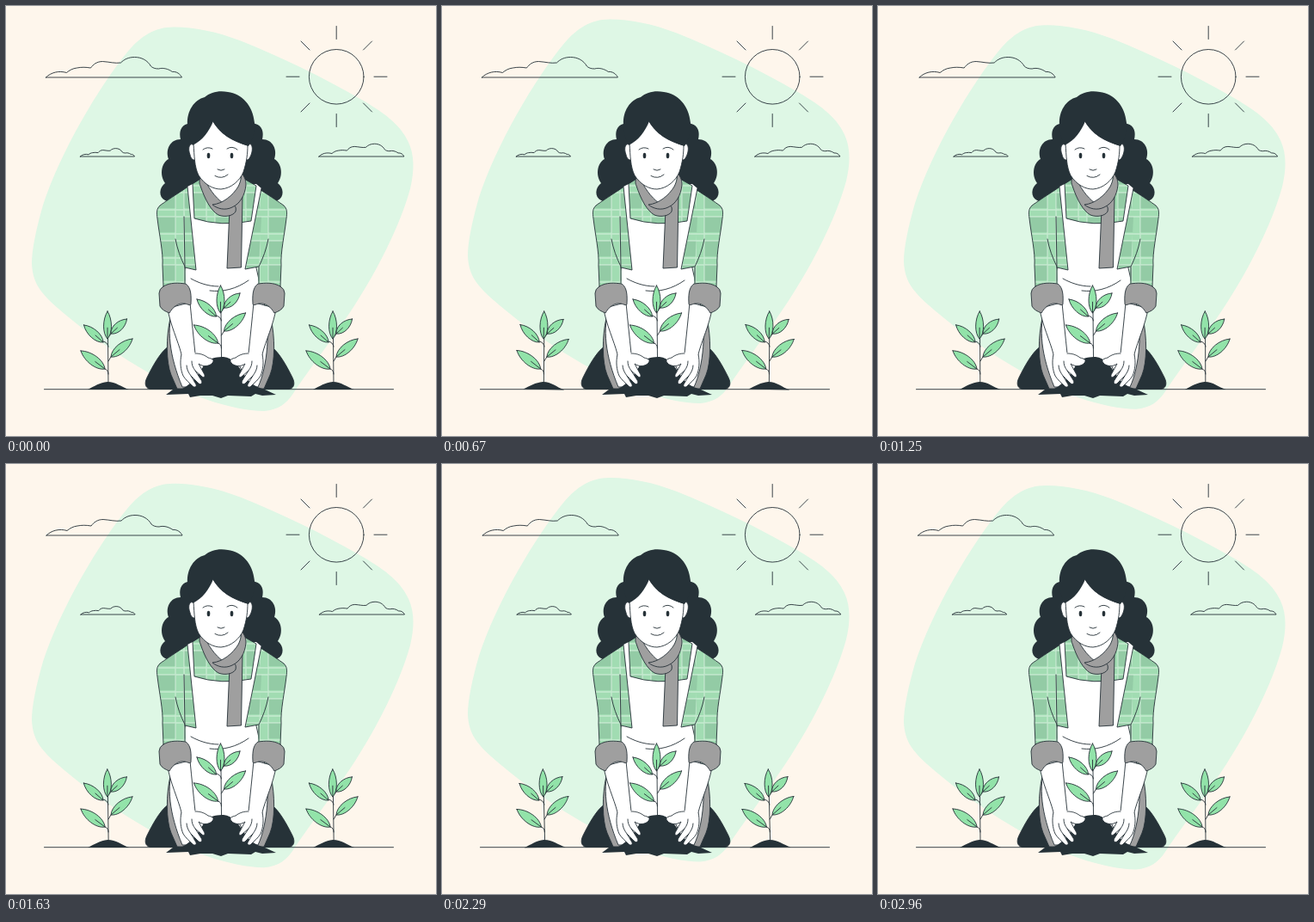
Recreate the animation shown at these times as an HTML page. Size 500 by 500 pixels, loop 3 s.

```html
<!DOCTYPE html>
<html lang="en">
<head>
<meta charset="utf-8">
<title>Planting</title>
<style>
  html, body { margin: 0; width: 100%; height: 100%; overflow: hidden; background: #fef6ec; }
  svg { display: block; width: 100%; height: 100%; }
  .line { fill: none; }
  .dark { fill: #263238; }
  .white { fill: #fff; }
  .grey { fill: #9f9f9f; }
  .leaf { fill: #92e3a9; }
  .plaid { fill: url(#plaid); }
  .bare { stroke: none; }
</style>
</head>
<body>
<svg viewBox="0 0 500 500" stroke="#263238" stroke-width=".9" stroke-linecap="round" stroke-linejoin="round">
  <defs>
    <pattern id="plaid" x="193" y="232" width="36" height="28" patternUnits="userSpaceOnUse">
      <path class="bare" fill="#93cba5" d="M0 0H36V28H0Z"/>
      <g class="line" stroke-linecap="butt">
        <path stroke="#b0edc0" stroke-width="10" stroke-opacity=".5" d="M9 0V28M0 8H36"/>
        <path stroke="#fff" stroke-width="1.3" stroke-opacity=".4" d="M4 0V28M14 0V28M0 5H36M0 13H36"/>
      </g>
    </pattern>
    <path id="cloud" class="line" vector-effect="non-scaling-stroke" d="M0 0H158C156-4 152-7 147-6.500C142-10 136-11.500 131-10C127-10 124-11 122-13C118-20 111-23.500 103-23.500C96-23.500 91-21 87-17C80-16 74-18 66-18.500C59-18.500 55-15 52-11C46-12 41-12 36-11C31-10.500 27-8 24-5.500C15-8 6-6 0 0Z"/>
    <g id="plant"></g>
    <path id="mound" class="dark bare" d="M95 446C103 442 109 438 118 437C128 437 134 443 143 446Z"/>
    <path id="curls" class="dark bare" d="M251 125L211 137C203 139 201 147 203 155C191 155 185 167 189 178C181 182 178 196 185 206C178 211 177 222 185 226C193 230 207 226 220 215L251 215Z"/>
    <path id="knee" class="dark" d="M189 396C179 402 169 422 164 432C160 440 163 445 168 445.500H201Z"/>
    <path id="side" class="grey" d="M191 363C186 385 186 414 192 429L199 445H214L211 400Z"/>
    <g id="sleeve">
      <path class="plaid bare" d="M218 206C206 214 190 224 179 232C175 236 175 240 176 247C178 265 183 287 182 302L183 326L209 325L207 246L212 212Z"/>
      <path class="line" d="M218 206C206 214 190 224 179 232C175 236 175 240 176 247C178 265 183 287 182 302L183 326M208 304V322M197 271C199 282 203 293 208 303"/>
    </g>
    <g id="arm">
      <path class="white" d="M188 352C191 371 200 389 204 405L210 432H224L232 415L220 404C218 385 216 366 214 345Z"/>
      <path class="grey" d="M183 326C191 321 201 322 209 323C213 326 216 331 215 346C215 349 212 347 208 346C200 345 194 350 190 357C185 355 181 353 179 349L178 334Q178 329 183 326Z"/>
    </g>
    <g id="hand">
      <path class="white bare" d="M204 404C202 414 203 423 206 430C209 435 213 438 217 442C219 444 222 443 221 440L215 430L224 439C227 441 229 438 227 435L220 424L228 431C231 433 232 430 230 427L224 416C229 420 237 419 240 415C243 411 239 410 235 409C230 405 225 404 220 403Z"/>
      <path class="line" d="M204 405C202 414 203 423 206 430C209 435 213 438 217 442C219 444 222 443 221 440L215 430L224 439C227 441 229 438 227 435L220 424L228 431C231 433 232 430 230 427L224 416C229 420 237 419 240 415C243 411 239 410 235 409C230 405 225 404 220 404M215 430C212 426 210 422 210 418M220 424C217 420 216 417 216 413"/>
    </g>
  </defs>

  <path id="blob" class="bare" fill="#def7e5" d="M197 25C175 24 157 35 142 53C108 94 63 171 43 232C35 260 30 284 30 300C31 323 41 334 57 349C109 394 171 436 233 458C259 467 281 471 300 471.500C317 470 326 463 334 451C362 409 399 364 430 307C449 272 463 239 470 213C475 192 475 174 468 159C458 137 437 123 411 108C368 83 320 60 273 41C244 30 218 25 197 25Z"/>
  <g id="sky">
    <use href="#cloud" transform="translate(46.600 83)"/>
    <use href="#cloud" transform="translate(86.500 175) scale(.4)"/>
    <use href="#cloud" transform="translate(364 175) scale(.627)"/>
  </g>
  <g class="line">
    <circle cx="384.200" cy="82.300" r="31.800"/>
    <path d="M384.200 23.500V38.500M384.200 125.500V140.500M326 82.200H341M428 82.200H443M343 41L353 51M425.500 41L415.500 51M343 123L353 113M425.500 123L415.500 113"/>
    <path d="M44.500 445.700H450.500"/>
  </g>

  <g class="sprout"><use href="#plant"/><use href="#mound"/></g>
  <g class="sprout"><use href="#plant" x="262"/><use href="#mound" x="262"/></g>

  <use href="#curls"/><use href="#curls" transform="matrix(-1 0 0 1 501 0)"/>
  <use href="#knee"/><use href="#knee" transform="matrix(-1 0 0 1 497 0)"/>
  <use href="#side"/><use href="#side" transform="matrix(-1 0 0 1 499 0)"/>
  <path class="white" d="M210 300L195 348C186 375 190 407 205 443H293C304 420 308 375 300 345L290 300Z"/>

  <use href="#sleeve"/><use href="#sleeve" transform="matrix(-1 0 0 1 502 0)"/>
  <path class="plaid bare" d="M211 210L207 246L208 304L221 307L278 306L294 303L297 246L292 210Z"/>
  <path class="white bare" d="M211 210L221 307L216 318H283L278 306L297 212L291 207H217Z"/>
  <path class="line" d="M211 210L221 307L208 304M207 245L208 304M297 212L278 306L294 303"/>
  <path class="plaid" d="M217 207L219 247Q250 257 285 250L291 209L275 200H228Z"/>
  <path class="line" d="M215 317C224 322 235 326 247 326M237 331C252 333 268 329 282 319"/>
  <use href="#arm"/><use href="#arm" transform="matrix(-1 0 0 1 502 0)"/>

  <path class="grey" d="M260 236L257 305L273.500 304L275 222Z"/>
  <path class="white bare" d="M228 194L232 212L250 231L270 215L274 194Z"/>
  <path class="grey" d="M228 195C225 199 224 205 226 209C231 224 238 238 247 243C255 246 264 244 267 239C269 230 262 230 252 229C243 222 235 212 228 195Z"/>
  <path class="grey" d="M273 194C277 197 279 202 279 208C278 220 272 230 263 234C255 238 246 236 240 231C252 230 264 220 270 210C273 204 274 199 273 194Z"/>
  <path class="white" d="M220 161C213 158 211 165 214 173C215 178 218 180 221 179M279 161C286 157 288 165 285 173C283 178 281 180 278 179"/>
  <path class="white" d="M240 133C234 145 226 154 218 160C219 174 219 187 224 197C231 208 241 213 250 213C262 212 272 203 276 193C280 181 281 171 281 162C263 157 249 149 240 133Z"/>
  <path class="dark bare" d="M211 138C212 150 214 157 217 162C229 156 236 146 241 134C249 149 264 157 282 163C286 158 290 146 289 136C287 115 274 102 258 100C248 98 238 100 231 106C219 109 210 122 211 138Z"/>
  <ellipse class="dark bare" cx="235.500" cy="174" rx="1.800" ry="3.200"/>
  <ellipse class="dark bare" cx="262.500" cy="174" rx="1.800" ry="3.200"/>
  <path class="line" d="M229 167Q234 163 240 166M257 166Q263 162 269 167M246 190Q250 192.500 254 190M243 197.500Q251 202 258 196"/>

  <path class="dark bare" d="M186 452L194 446L205 445C217 439 225 427 231 416C237 408 248 408 253 408C264 409 270 418 277 429C283 439 291 443 301 446L314 452L298 453L290 451L285 454L258 453L250 456L240 453L226 453L214 455L212 451Z"/>
  <use href="#plant" x="131.500" y="-30"/>
  <use href="#hand"/><use href="#hand" transform="matrix(-1 0 0 1 502 0)"/>
</svg>
<script>
  const $ = id => document.getElementById(id);

  // A leaf runs from its tip to its base; w is the bulge on either side.
  function leaf(tx, ty, bx, by, w) {
    const dx = bx - tx, dy = by - ty, len = Math.hypot(dx, dy);
    const at = (along, out) =>
      `${(tx + dx * along - dy / len * out).toFixed(1)} ${(ty + dy * along + dx / len * out).toFixed(1)}`;
    return `<path class="leaf" d="M${tx} ${ty}C${at(.3, w)} ${at(.8, w)} ${bx} ${by}C${at(.8, -w)} ${at(.3, -w)} ${tx} ${ty}Z"/>` +
      `<path class="line" d="M${at(.6, 0)}L${bx} ${by}"/>`;
  }

  $('plant').innerHTML =
    '<path class="line" d="M118.500 385L119 438M119 396Q118 391 113 390M119 385L123 380M119 428Q119 423 115 422M119 413L122 408"/>' +
    [[118, 355, 118, 387, 6], [90.5, 371, 113, 391, 6.5], [140.5, 364, 122, 381, 6.5],
     [87, 401, 115, 422, 7.5], [147, 387, 122, 408, 7]].map(a => leaf(...a)).join('');

  // Keys are [position, value] pairs, joined by straight lines.
  function track(keys, p) {
    const i = Math.max(1, keys.findIndex(k => k[0] >= p));
    const [a, x] = keys[i - 1], [b, y] = keys[i];
    return x + (y - x) * (p - a) / (b - a);
  }

  const FLOAT = [[0, 0], [.5, -10], [1, 0]];
  const SHAKE = [0, -1, 2, -4, 4, -4, 4, -4, 2, -1, 0].map((x, i) => [i / 10, x]);
  const WIND = [[0, 0], [.25, 1], [.75, -1], [1, 0]];
  const STEP = 1000 / 24;
  const sprouts = document.querySelectorAll('.sprout');

  function draw(now) {
    const step = Math.floor((now % 3000 + 5) / STEP) + 1;
    const p = step % 72 / 72;
    $('blob').setAttribute('transform', `translate(0 ${track(FLOAT, p * 2 % 1)})`);
    $('sky').setAttribute('transform', `translate(${track(SHAKE, p)} 0)`);
    sprouts.forEach((s, i) =>
      s.setAttribute('transform', `rotate(${track(WIND, p)} ${118 + i * 262} 400)`));
  }

  const start = performance.now();
  function tick() {
    draw(performance.now() - start);
    requestAnimationFrame(tick);
  }
  tick();
</script>
</body>
</html>
```
